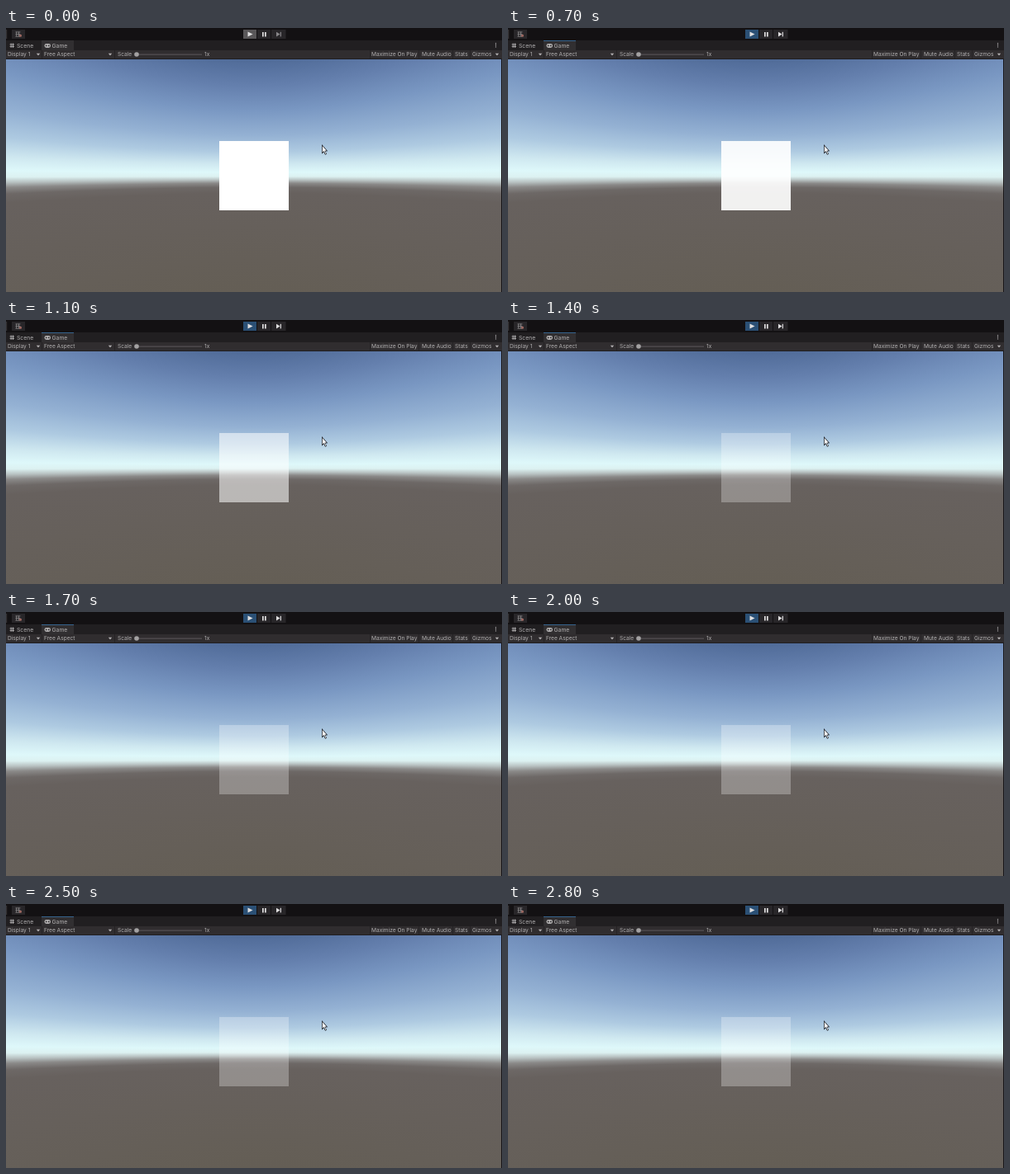
Animation of 600 by 320 pixels, one loop 2.9 s. Source, as an HTML page with a canvas:

```html
<!DOCTYPE html>
<html>
<head>
<meta charset="utf-8">
<style>
html, body { margin: 0; width: 100%; height: 100%; overflow: hidden; background: #131113; }
canvas { display: block; }
</style>
</head>
<body>
<canvas id="stage" width="600" height="320"></canvas>
<script>
const ctx = document.getElementById('stage').getContext('2d');
const LOOP = 2900, STEP = 100, PLAY_AT = 300;
const TEXT = '#b2b0b1';

function rect(x, y, w, h, color) {
  ctx.fillStyle = color;
  ctx.fillRect(x, y, w, h);
}

function poly(color, ...points) {
  ctx.fillStyle = color;
  ctx.beginPath();
  for (let i = 0; i < points.length; i += 2) ctx.lineTo(points[i], points[i + 1]);
  ctx.closePath();
  ctx.fill();
}

function dot(x, y, r, color) {
  ctx.fillStyle = color;
  ctx.beginPath();
  ctx.arc(x, y, r, 0, Math.PI * 2);
  ctx.fill();
}

function label(text, x, y, size = 6.6) {
  ctx.font = `${size}px Inter, sans-serif`;
  ctx.fillStyle = TEXT;
  ctx.fillText(text, x, y);
}

function arrowDown(x, y) {
  poly(TEXT, x - 2.2, y - 1.2, x + 2.2, y - 1.2, x, y + 1.5);
}

// Wide-angle skybox: lines of equal elevation are hyperbolas around y = 179.
function makeSky() {
  const sky = document.createElement('canvas');
  sky.width = 600;
  sky.height = 320;
  const c = sky.getContext('2d');
  const stops = [
    [38, '#506b98'], [70, '#647fad'], [100, '#7997c2'], [130, '#94b1d3'],
    [150, '#aecae1'], [165, '#cfe8f0'], [175, '#def8fa'], [180, '#dcf1f1'],
    [184, '#b9c3c3'], [188, '#8a8988'], [193, '#6d6866'], [200, '#67615e'],
    [320, '#645e55']
  ];
  for (let x = 0; x < 599; x++) {
    const stretch = Math.hypot(1, (x + 0.5 - 300) / 244);
    const gradient = c.createLinearGradient(0, 179 - 141 * stretch, 0, 179 + 141 * stretch);
    for (const [y, color] of stops) gradient.addColorStop((y - 38) / 282, color);
    c.fillStyle = gradient;
    c.fillRect(x, 38, 1, 282);
  }
  return sky;
}
const sky = makeSky();

function drawTransport(playing) {
  const icon = '#e0dfe0', idle = playing ? icon : '#89878a';
  rect(287, 2, 16, 11, playing ? '#2b5075' : '#595759');
  rect(304, 2, 16, 11, '#282629');
  rect(321, 2, 17.5, 11, '#282629');
  poly(icon, 292.5, 4.5, 298.5, 7.5, 292.5, 10.5);
  rect(310, 5, 1.7, 5.5, icon);
  rect(313, 5, 1.7, 5.5, icon);
  poly(idle, 327, 4.8, 331.5, 7.6, 327, 10.4);
  rect(331.7, 4.8, 1.2, 5.6, idle);
}

function drawTabs(playing) {
  rect(0, 15, 600, 12, '#211f21');
  rect(43, 15, 39, 12, '#312f31');
  if (playing) rect(43, 15, 39, 1, '#37648e');

  for (const p of [0, 2.4]) {
    rect(5.7 + p, 18.5, 0.9, 5.5, TEXT);
    rect(4.6, 19.5 + p, 5.4, 0.9, TEXT);
  }
  label('Scene', 13, 21.5, 6.8);

  ctx.fillStyle = TEXT;
  ctx.beginPath();
  ctx.roundRect(46.5, 19, 7.5, 5, 2.4);
  ctx.fill();
  dot(48.7, 21.4, 0.9, '#312f31');
  dot(51.8, 21.4, 0.9, '#312f31');
  label('Game', 55.5, 21.5, 6.8);
  for (const y of [18.7, 20.8, 22.9]) dot(592.5, y, 0.7, TEXT);
}

function drawOptions() {
  rect(0, 27, 600, 11, '#302d2f');
  for (const x of [43, 131, 440, 499, 540, 561]) rect(x, 27, 0.7, 10, '#222022');
  rect(0, 37, 600, 1, '#201f22');
  label('Display 1', 2, 32.2);
  arrowDown(39, 32);
  label('Free Aspect', 46, 32.2);
  arrowDown(126, 32);
  label('Scale', 135, 32.2);
  rect(158, 31.7, 79, 0.8, '#676567');
  dot(158, 32, 2.8, '#a3a1a2');
  label('1x', 240, 32.2);
  label('Maximize On Play', 442, 32.2);
  label('Mute Audio', 503, 32.2);
  label('Stats', 543, 32.2);
  label('Gizmos', 564, 32.2);
  arrowDown(594, 32);
}

function drawToolbar() {
  rect(0, 0, 600, 15, '#131113');
  rect(0, 2, 1.2, 11, '#343234');
  rect(7, 2, 16, 11, '#282629');
  for (const p of [0, 2.6, 5.2]) {
    rect(11.5, 4.6 + p, 6, 0.7, '#959394');
    if (p < 5) rect(12.4 + p, 4.6, 0.7, 5.5, '#959394');
  }
  rect(16.2, 8, 2.6, 2.6, '#a36a63');
}

function drawCursor() {
  poly('#20242c', 382, 141, 382, 152.5, 384.4, 150.4, 386.1, 153.8, 388, 152.8, 386.4, 149.6, 389.2, 149.2);
  poly('#fff', 382.8, 143, 382.8, 150.8, 384.7, 149.1, 386.4, 152.7, 387.2, 152.3, 385.5, 148.8, 387.6, 148.5);
}

function draw(now) {
  const time = Math.floor(now % LOOP / STEP) * STEP;
  const playing = time >= PLAY_AT;
  const alpha = 1 - 0.09 * Math.min(8, Math.max(0, (time - 600) / STEP));

  ctx.textBaseline = 'middle';
  drawToolbar();
  drawTransport(playing);
  drawTabs(playing);
  drawOptions();
  ctx.drawImage(sky, 0, 0);
  rect(599, 38, 1, 282, '#171518');
  rect(258, 137, 84, 84, `rgba(255, 255, 255, ${alpha})`);
  drawCursor();
  requestAnimationFrame(() => draw(performance.now() - start));
}

const start = performance.now();
draw(0);
</script>
</body>
</html>
```
